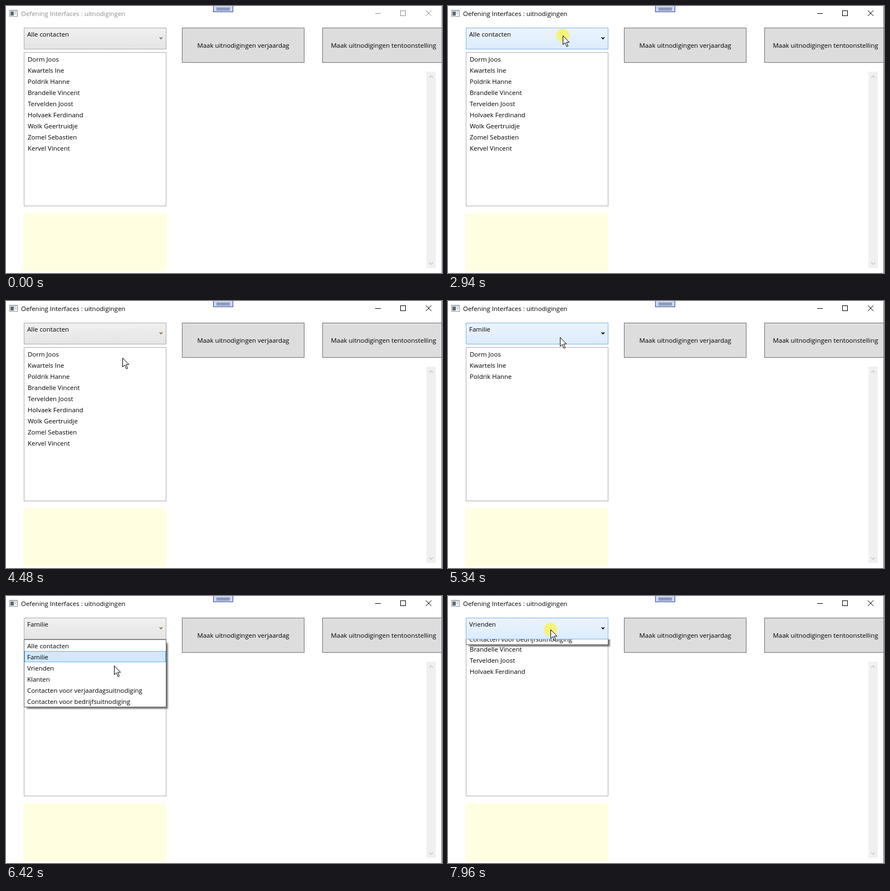
An HTML page that plays this animation: 783x480 px, repeating every 8000 ms.

```html
<!DOCTYPE html>
<html lang="nl">
<head>
<meta charset="utf-8">
<title>Uitnodigingen</title>
<style>
html, body { margin: 0; width: 100%; height: 100%; overflow: hidden; background: #fff; }
svg { display: block; }
text { font: 11.45px "Open Sans", "Noto Sans", sans-serif; white-space: pre; }
.mid { text-anchor: middle; }
</style>
</head>
<body>
<svg width="783" height="480" viewBox="0 0 783 480">
  <defs>
    <linearGradient id="plain" x2="0" y2="1"><stop stop-color="#f0f0f0"/><stop offset="1" stop-color="#e5e5e5"/></linearGradient>
    <linearGradient id="hot" x2="0" y2="1"><stop stop-color="#ecf4fc"/><stop offset="1" stop-color="#dcecfc"/></linearGradient>
    <clipPath id="below"><path d="M0 78H783V480H0z"/></clipPath>
  </defs>
  <rect width="783" height="480" fill="#fff"/>

  <g id="icon">
    <rect x="6.5" y="7.5" width="14" height="11" fill="#fff" stroke="#8a8d91"/>
    <path d="M6 7H21V9H6z" fill="#a5a9ae"/>
    <path d="M8 10H14V17H8z" fill="#5a6a73"/>
    <path d="M15 10.5H19M15 12.5H19M15 14.5H19" stroke="#b5b9bd"/>
  </g>
  <text id="title" x="27" y="18">Oefening Interfaces : uitnodigingen</text>
  <g id="controls" fill="none">
    <path d="M663 13.5H673"/>
    <rect x="708.5" y="8.5" width="9" height="9"/>
    <path d="M754 8L764 18M764 8L754 18"/>
  </g>
  <rect x="372.5" y="-1" width="35" height="11.5" fill="#c9d7f4" stroke="#34478c"/>
  <path d="M378 4H402M378 7H402" stroke="#1c2a5e"/>

  <rect id="party" x="316.5" y="39.5" width="219" height="62"/>
  <text class="mid" x="426" y="75">Maak uitnodigingen verjaardag</text>
  <rect x="568.5" y="39.5" width="219" height="62" fill="#ddd" stroke="#707070"/>
  <text class="mid" x="678" y="75">Maak uitnodigingen tentoonstelling</text>

  <path d="M755 118H772V471H755z" fill="#f0f0f0"/>
  <path d="M760 129L763.5 125.5L767 129M760 461L763.5 464.5L767 461" fill="none" stroke="#c2c2c2" stroke-width="1.3"/>
  <path id="edge" d="M782.5 0V480"/>

  <rect id="combo" x="32.5" y="39.5" width="255" height="38"/>
  <text id="choice" x="38" y="55"></text>
  <path id="chevron" d="M275.8 56.3L278.3 59L280.8 56.3" fill="none"/>

  <rect x="32.5" y="83.5" width="255" height="276" fill="#fff" stroke="#abadb3"/>
  <rect id="rowHover" x="34.5" width="251" height="19" fill="#e5f3fb" stroke="#70c0e7"/>
  <g id="rows"></g>
  <path d="M31 373H288V477H31z" fill="#fffee0"/>

  <g clip-path="url(#below)">
    <g id="menu">
      <g id="shadow" fill="#000" fill-opacity=".17"></g>
      <rect x="32.5" y="78.5" width="255" height="121" fill="#fff" stroke="#646464"/>
      <rect id="itemSelected" x="33.5" width="253" height="19"/>
      <rect id="itemHover" x="33.5" width="253" height="19" fill="#e5f3fb" stroke="#70c0e7"/>
      <g id="items"></g>
    </g>
  </g>

  <circle id="click" r="12" fill="#f4f37c"/>
  <path id="cursor" d="M.5.5V16.5L4.2 13L7.2 20L9.6 19L6.7 12.2H11.7z" fill="#fff" stroke="#000"/>
</svg>
<script>
const LOOP = 8000;
const SVG = "http://www.w3.org/2000/svg";
const $ = id => document.getElementById(id);

const people = [
  "Dorm Joos", "Kwartels Ine", "Poldrik Hanne",
  "Brandelle Vincent", "Tervelden Joost", "Holvaek Ferdinand",
  "Wolk Geertruidje", "Zomel Sebastien", "Kervel Vincent"
];
const groups = [
  "Alle contacten", "Familie", "Vrienden", "Klanten",
  "Contacten voor verjaardagsuitnodiging", "Contacten voor bedrijfsuitnodiging"
];

// time, x, y of the pointer tip
const path = [
  [970, 400, 319], [1050, 382, 220], [1130, 362, 120], [1200, 345, 80], [1270, 334, 61],
  [1480, 240, 54], [1680, 206, 53], [3640, 206, 53], [4160, 209, 102],
  [4900, 209, 102], [5250, 203, 67], [5400, 200, 64], [5860, 200, 64],
  [5960, 199, 78], [6200, 195, 106], [6440, 194, 127],
  [7265, 194, 127], [7350, 195, 121], [7560, 190, 85], [7800, 184, 60]
];
const clicks = [[2940, 3100], [4400, 4475], [5440, 5600], [6730, 6880], [7945, 8000]];
const openings = [[3010, 4475], [5500, 6880], [7943, 8000]];
const SLIDE = 230, MENU_HEIGHT = 122, HOVER_LAG = 90;

const during = (spans, t) => spans.find(([from, to]) => t >= from && t < to);

function set(id, attrs) {
  for (const key in attrs) $(id).setAttribute(key, attrs[key]);
}
function show(id, visible) {
  $(id).style.display = visible ? "" : "none";
}
function add(parent, tag, attrs, content = "") {
  const node = document.createElementNS(SVG, tag);
  for (const key in attrs) node.setAttribute(key, attrs[key]);
  node.textContent = content;
  parent.append(node);
  return node;
}

function pointer(t) {
  if (t < path[0][0]) return null;
  const next = path.findIndex(p => p[0] > t);
  if (next < 0) return path[path.length - 1].slice(1);
  const [t0, x0, y0] = path[next - 1], [t1, x1, y1] = path[next];
  const k = (t - t0) / (t1 - t0);
  return [Math.round(x0 + (x1 - x0) * k), Math.round(y0 + (y1 - y0) * k)];
}

const rowNodes = people.map((_, i) => add($("rows"), "text", { x: 39, y: 100 + 20 * i }));
groups.forEach((name, i) => add($("items"), "text", { x: 38, y: 94 + 20 * i }, name));
for (let i = 0; i < 4; i++) {
  add($("shadow"), "rect", { x: 36 + i, y: 83 + i, width: 256 - 2 * i, height: 121 - 2 * i, rx: 3 });
}

function draw(t) {
  const active = t >= 2940;
  const tip = pointer(t);
  const over = pointer(t - HOVER_LAG) || [-1, -1];
  const inside = (x0, y0, x1, y1) => over[0] >= x0 && over[0] < x1 && over[1] >= y0 && over[1] < y1;
  const group = t < 4555 ? 0 : t < 6955 ? 1 : 2;
  const names = group ? people.slice(3 * group - 3, 3 * group) : people;

  set("title", { fill: active ? "#000" : "#8c8c8c" });
  set("controls", { stroke: active ? "#000" : "#8c8c8c" });
  set("edge", { stroke: active ? "#707070" : "#a0a0a0" });

  const onParty = inside(316, 39, 536, 102);
  set("party", { fill: onParty ? "#bee6fd" : "#ddd", stroke: onParty ? "#3c7fb1" : "#707070" });

  const onCombo = inside(32, 39, 288, 78);
  set("combo", { fill: onCombo ? "url(#hot)" : "url(#plain)", stroke: onCombo ? "#7eb4ea" : "#acacac" });
  set("chevron", {
    stroke: onCombo ? "#000" : active ? "#805524" : "#555",
    "stroke-width": onCombo ? 1.7 : 1.3
  });
  $("choice").textContent = groups[group];

  const open = during(openings, t);
  const row = Math.floor((over[1] - 85) / 20);
  rowNodes.forEach((node, i) => node.textContent = names[i] || "");
  show("rowHover", !open && t >= 4555 && inside(33, 85, 287, 359) && row < names.length);
  set("rowHover", { y: 85.5 + 20 * row });

  show("menu", open);
  if (open) {
    const shown = Math.min(1, (t - open[0]) / SLIDE);
    const item = inside(33, 79, 287, 199) ? Math.floor((over[1] - 79) / 20) : -1;
    const both = item === group;
    set("menu", { transform: `translate(0 ${Math.round((shown - 1) * MENU_HEIGHT)})` });
    set("itemSelected", {
      y: 79.5 + 20 * group,
      fill: both ? "#d1e8ff" : "#cbe8f6",
      stroke: both ? "#66b2ff" : "#26a0da"
    });
    show("itemHover", item >= 0 && !both);
    set("itemHover", { y: 79.5 + 20 * item });
  }

  show("cursor", tip);
  show("click", tip && during(clicks, t));
  if (tip) {
    set("cursor", { transform: `translate(${tip})` });
    set("click", { cx: tip[0], cy: tip[1] });
  }
}

const start = performance.now();
function tick() {
  draw((performance.now() - start) % LOOP);
  requestAnimationFrame(tick);
}
tick();
</script>
</body>
</html>
```
